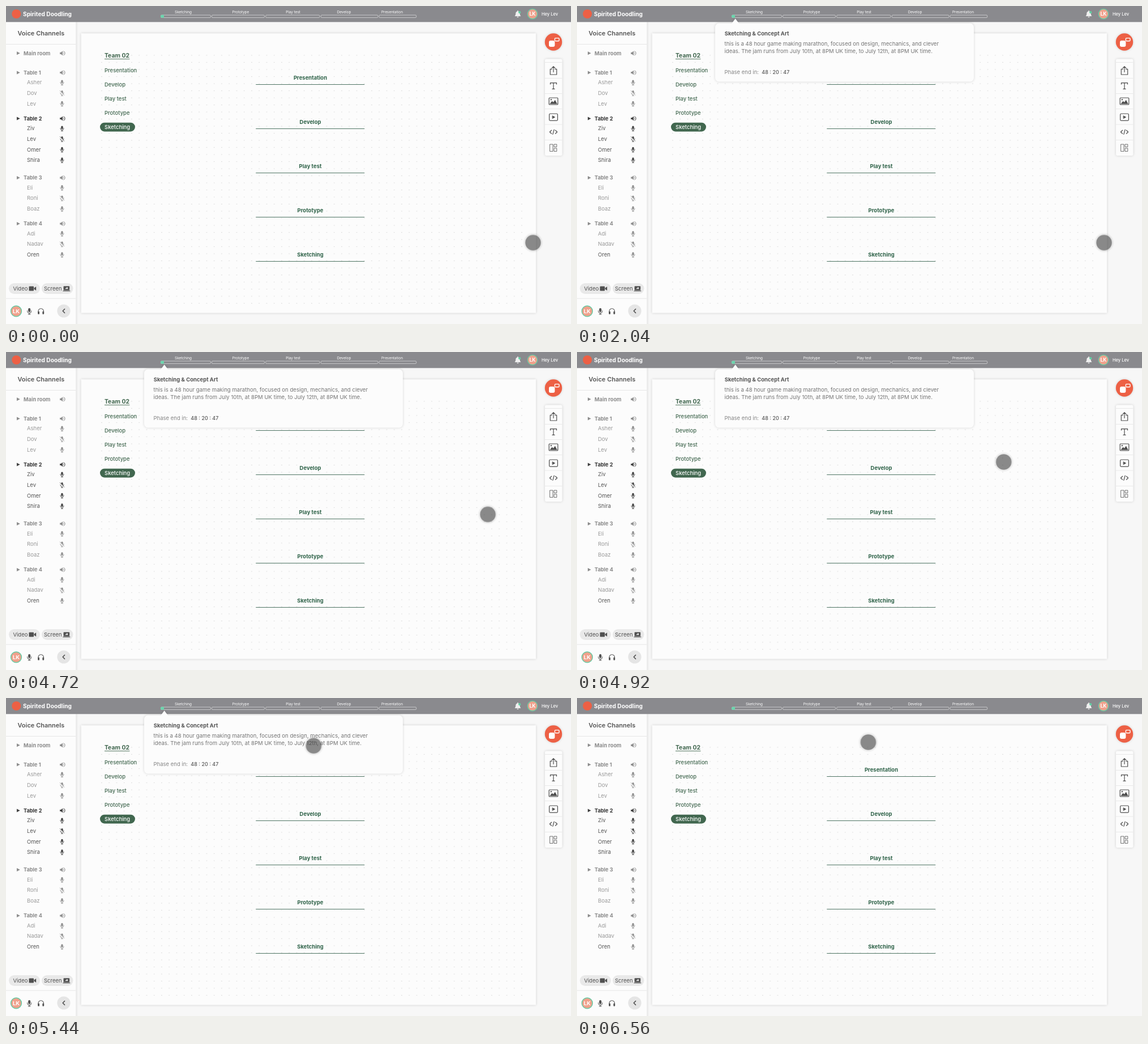
Animation of 998x561 px, one loop 7360 ms. Source, as an HTML page:

```html
<!DOCTYPE html>
<html lang="en">
<head>
<meta charset="utf-8">
<title>Jam board</title>
<style>
  html, body { margin: 0; width: 100%; height: 100%; overflow: hidden; background: #f7f7f7; }
  svg { display: block; width: 998px; height: 561px; }
  text { font-family: Inter, "Open Sans", sans-serif; font-size: 9.5px; }
  .mid { text-anchor: middle; }
  .b { font-weight: 700; }
  .m { font-weight: 500; }
  .line { fill: none; stroke: currentColor; stroke-linecap: round; stroke-linejoin: round; }
  .soft { filter: drop-shadow(0 0 2px rgba(0, 0, 0, .16)); }

  #popup { animation: popup 7360ms step-end infinite; }
  #moveX { animation: move-x 7360ms linear infinite; }
  #moveY { animation: move-y 7360ms linear infinite; }

  @keyframes popup {
    0% { opacity: 0; }
    27.174% { opacity: .5; }
    27.717% { opacity: 1; }
    88.587% { opacity: .5; }
    89.13%, 100% { opacity: 0; }
  }
  @keyframes move-x {
    0% { transform: translateX(931px); }
    57.065% { transform: translateX(931px); animation-timing-function: cubic-bezier(.33, 0, .67, .18); }
    64.13% { transform: translateX(851.5px); animation-timing-function: cubic-bezier(.33, .25, .67, .6); }
    67.391% { transform: translateX(730.5px); animation-timing-function: cubic-bezier(.33, .335, .67, .7); }
    69.565% { transform: translateX(635px); animation-timing-function: cubic-bezier(.33, .5, .67, .81); }
    72.283% { transform: translateX(564px); animation-timing-function: cubic-bezier(.33, .63, .67, .96); }
    77.717% { transform: translateX(522px); animation-timing-function: cubic-bezier(.33, .37, .67, 1); }
    86.957%, 100% { transform: translateX(514.5px); }
  }
  @keyframes move-y {
    0% { transform: translateY(417.5px); }
    57.065% { transform: translateY(417.5px); animation-timing-function: cubic-bezier(.33, 0, .67, .36); }
    64.13% { transform: translateY(287px); animation-timing-function: cubic-bezier(.33, .35, .67, .69); }
    67.391% { transform: translateY(177px); animation-timing-function: cubic-bezier(.33, .38, .67, .79); }
    69.565% { transform: translateY(117px); animation-timing-function: cubic-bezier(.33, .59, .67, .85); }
    72.283% { transform: translateY(90px); animation-timing-function: cubic-bezier(.33, .83, .67, .95); }
    77.717% { transform: translateY(80px); animation-timing-function: cubic-bezier(.33, .37, .67, 1); }
    86.957%, 100% { transform: translateY(78px); }
  }
</style>
</head>
<body>
<svg viewBox="0 0 998 561" xmlns="http://www.w3.org/2000/svg">
  <defs>
    <pattern id="dots" x="162.4" y="80.75" width="13.25" height="12.5" patternUnits="userSpaceOnUse">
      <circle cx="6.6" cy="6.25" r=".7" fill="#d0d0d0"/>
    </pattern>
    <g id="mic">
      <rect x="-1.7" y="-4.5" width="3.4" height="5.9" rx="1.7" fill="currentColor"/>
      <path class="line" stroke-width=".8" d="M-3-.6v.5a3 3 0 0 0 6 0v-.5M0 3v1.6M-1.6 4.6h3.2"/>
    </g>
    <g id="muted">
      <use href="#mic"/>
      <path d="M-4-3.4 3.6 4.2" stroke="#fcfcfc" stroke-width="1.8"/>
      <path class="line" d="M-3.6-4 3.8 3.6" stroke-width=".8"/>
    </g>
    <g id="speaker" fill="currentColor">
      <path d="M-4.3-1.6h2.1L.5-4.1v8.2L-2.2 1.6h-2.1z"/>
      <path class="line" stroke-width=".9" d="M2-1.6a2 2 0 0 1 0 3.2M2-3.6a3.7 3.7 0 0 1 0 7.2"/>
    </g>
    <path id="arrow" d="M-2.8-3 3-0-2.8 3z" fill="currentColor"/>
    <g id="avatar">
      <circle r="8.7" fill="#f0a18c" stroke="#68c9a3" stroke-width="1.4"/>
      <text class="mid b" y="3.1" fill="#fff" style="font-size:8.6px">LK</text>
    </g>
  </defs>

  <rect width="998" height="561" fill="#f7f7f7"/>

  <g id="board">
    <rect class="soft" x="132.7" y="48.3" width="803.3" height="493.2" fill="#fcfcfc"/>
    <rect x="162.4" y="80.75" width="755.25" height="450" fill="url(#dots)"/>
    <g id="menu" fill="#41674f">
      <text class="b" x="174" y="91.3" style="font-size:10.4px">Team 02</text>
      <path d="M174 93.5h44.5" stroke="#41674f" stroke-width=".9"/>
      <rect x="166" y="205.8" width="62" height="15.6" rx="7.8"/>
    </g>
    <g id="stages" fill="#2f6349"></g>
  </g>

  <g id="sidebar">
    <rect class="soft" y="20" width="123.5" height="545" fill="#fcfcfc"/>
    <text x="20.5" y="52.4" fill="#555" style="font-size:11px;font-weight:600">Voice Channels</text>
    <path d="M0 67.5h123.5M0 516h123.5" stroke="#e6e6e6"/>
    <g id="rooms"></g>
    <g fill="#e9e9e9">
      <rect x="5" y="489" width="55" height="19" rx="9.5"/>
      <rect x="63" y="489" width="55.5" height="19" rx="9.5"/>
      <circle cx="102" cy="538" r="11.6" fill="#e5e5e5"/>
    </g>
    <g fill="#505050" color="#505050">
      <text x="12.5" y="502">Video</text>
      <rect x="40.5" y="494.5" width="8.6" height="8" rx="1.2"/>
      <path d="M49.6 497.4l3.6-2.4v7l-3.6-2.4z"/>
      <text x="67" y="502">Screen</text>
      <rect x="101.6" y="494.2" width="10.6" height="7.2" rx="1"/>
      <path d="M100.5 502.6h12.8" stroke="#505050" stroke-width="1.2"/>
      <path d="M104.4 499.6q.4-2.6 3-2.6v-1.3l2.4 2-2.4 2v-1.3q-1.8 0-3 1.2z" fill="#fff"/>
      <use href="#avatar" transform="translate(18 538.4) scale(1.08)"/>
      <use href="#mic" transform="translate(41.2 538.4) scale(1.2)"/>
      <path class="line" stroke-width="1.1" d="M57 540v-1.6a4.7 4.7 0 0 1 9.4 0v1.6"/>
      <rect x="56.2" y="538.8" width="2.8" height="5" rx="1"/>
      <rect x="64.4" y="538.8" width="2.8" height="5" rx="1"/>
      <path class="line" stroke-width="1.5" d="M103.6 534.6l-3.4 3.4 3.4 3.4"/>
    </g>
  </g>

  <g id="header">
    <rect width="998" height="28.3" fill="#8a8a8e"/>
    <circle cx="18.3" cy="14" r="8" fill="#ed6045"/>
    <text class="b" x="30" y="17.6" fill="#fff" style="font-size:10.2px">Spirited Doodling</text>
    <g id="phases" fill="#fff"></g>
    <g fill="#efefef">
      <path d="M898.6 18q1.7-1.6 1.7-4.6a3.7 3.9 0 0 1 7.4 0q0 3 1.7 4.6z"/>
      <path d="M902.5 18.7h3a1.5 1.5 0 0 1-3 0z"/>
      <circle cx="904" cy="9" r="1"/>
      <circle cx="907.2" cy="11.2" r="2.1" fill="#63d0a4"/>
    </g>
    <use href="#avatar" x="930" y="14"/>
    <text class="m" x="946" y="17" fill="#fff" style="font-size:7.5px">Hey Lev</text>
  </g>

  <g id="tools">
    <circle class="soft" cx="967" cy="63.5" r="15.2" fill="#ed6045"/>
    <rect x="959" y="61" width="10.4" height="11" rx="3" fill="#fff"/>
    <rect x="969.4" y="56.6" width="7.6" height="5.2" rx="1.2" fill="none" stroke="#fff" stroke-width="1.4"/>
    <rect class="soft" x="952" y="93.5" width="30.5" height="170.5" rx="3" fill="#fcfcfc"/>
    <path d="M952 99.5h30.5M952 127.5h30.5M952 154.5h30.5M952 181.5h30.5M952 209h30.5M952 236.5h30.5" stroke="#e9e9e9"/>
    <g class="line" color="#4c4c4c" stroke-width="1.2">
      <path d="M964.2 111.4h-2.9v9.6h11.4v-9.6h-2.9M967 116.6v-9.6M964 109.6l3-3 3 3"/>
      <path d="M961.5 138v-2.4h11v2.4M967 135.6v10.8M965 146.4h4"/>
      <rect x="959.2" y="162" width="15.6" height="12" rx="1"/>
      <path d="M961 172.4l3.6-4.4 2.2 2.2 3-4 3.4 6.2z" fill="#4c4c4c" stroke-width=".6"/>
      <circle cx="962.8" cy="165.2" r=".9" fill="#4c4c4c" stroke-width=".6"/>
      <rect x="959.6" y="190" width="14.8" height="12.2" rx="1.8"/>
      <path d="M965.4 193.8l4.2 2.3-4.2 2.3z" fill="#4c4c4c" stroke-width=".8"/>
      <path d="M963.6 219.2l-3.2 3 3.2 3M970.4 219.2l3.2 3-3.2 3M968.2 218l-2.4 8.4"/>
      <g stroke-width=".8">
        <rect x="961" y="244" width="5" height="12.4"/>
        <rect x="968.4" y="244" width="4.4" height="4.6"/>
        <rect x="968.4" y="251" width="4.4" height="5.4"/>
      </g>
    </g>
  </g>

  <g id="popup">
    <path class="soft" fill="#fcfcfc" d="M251 30.5h22.5l6.2-8.3 6.2 8.3H694a7 7 0 0 1 7 7v89a7 7 0 0 1-7 7H251a7 7 0 0 1-7-7v-89a7 7 0 0 1 7-7z"/>
    <g fill="#757575">
      <text class="b" x="260.7" y="52.1" fill="#555">Sketching &amp; Concept Art</text>
      <text x="260.5" y="70.2" style="font-size:9.6px">this is a 48 hour game making marathon, focused on design, mechanics, and clever</text>
      <text x="260.5" y="82.7" style="font-size:9.6px">ideas. The jam runs from July 10th, at 8PM UK time, to July 12th, at 8PM UK time.</text>
      <text x="260.5" y="119.9" fill="#858585">Phase end in:</text>
      <text class="m" x="326.3" y="119.9" fill="#555" style="font-size:9px">48 : 20 : 47</text>
    </g>
  </g>

  <g id="moveX"><g id="moveY">
    <circle r="16.4" fill="none" stroke="#000" stroke-opacity=".03" stroke-width="2"/>
    <circle r="14.8" fill="none" stroke="#000" stroke-opacity=".07" stroke-width="2"/>
    <circle r="13.8" fill="#3c3c3c" fill-opacity=".6"/>
  </g></g>
</svg>
<script>
  const add = (id, markup) => document.getElementById(id).insertAdjacentHTML('beforeend', markup);
  const label = (x, y, text, cls = '', attrs = '') =>
    `<text class="${cls}" x="${x}" y="${y}" ${attrs}>${text}</text>`;
  const icon = (name, x, y) => `<use href="#${name}" x="${x}" y="${y}"/>`;

  const phases = ['Sketching', 'Prototype', 'Play test', 'Develop', 'Presentation'];

  // Header progress: label centre, left and right edge
  const spans = [[313, 273.5, 361.5], [414.5, 363.5, 456.5], [507, 458.7, 554], [597, 556.3, 657], [682, 659, 724.7]];
  spans.forEach(([mid, left, right], i) => add('phases',
    label(mid, 12.7, phases[i], 'mid', 'style="font-size:6.4px"') +
    `<rect x="${left}" y="16" width="${right - left}" height="4.5" rx="1.5" fill="none" stroke="#fff" stroke-width=".6" stroke-opacity=".85"/>`));
  add('phases', '<path d="M279 15.7v5.1h-3.8a2.2 2.2 0 0 1-2.2-2.2v-.7a2.2 2.2 0 0 1 2.2-2.2z" fill="#6bd5ad"/>');

  [...phases].reverse().forEach((name, i) => {
    const last = i === phases.length - 1;
    add('menu', label(174, 117 + i * 24.9, name, 'm', last ? 'fill="#fff"' : ''));
    const y = 138.5 + i * 78;
    add('stages', label(537.5, y - 8.2, name, 'mid b') +
      `<path d="M441.3 ${y}h192" stroke="#4f7564"/>`);
  });

  // A leading "-" marks a muted member, "+" an active one
  const rooms = [
    [83.3, 'Main room', []],
    [117.5, 'Table 1', ['Asher', '-Dov', 'Lev']],
    [198.5, 'Table 2', ['Ziv', '-Lev', 'Omer', 'Shira']],
    [303, 'Table 3', ['Eli', '-Roni', 'Boaz']],
    [384, 'Table 4', ['Adi', '-Nadav', '+Oren']],
  ];
  rooms.forEach(([top, title, people]) => {
    const active = title === 'Table 2';
    const tone = active ? '#333' : '#8a8a8a';
    let out = icon('arrow', 21.8, top) + icon('speaker', 99.5, top) +
      label(31, top + 3.3, title, 'b', `fill="${tone}" style="font-size:9.2px"`);
    people.forEach((person, i) => {
      const y = top + 17.5 + i * 18.6;
      const dark = active || person[0] === '+';
      out += label(37, y + 3.3, person.replace(/^[-+]/, ''), '', `fill="${dark ? '#555' : '#999'}"`) +
        icon(person[0] === '-' ? 'muted' : 'mic', 99, y);
    });
    add('rooms', `<g color="${active ? '#444' : '#8e8e8e'}">${out}</g>`);
  });
</script>
</body>
</html>
```
